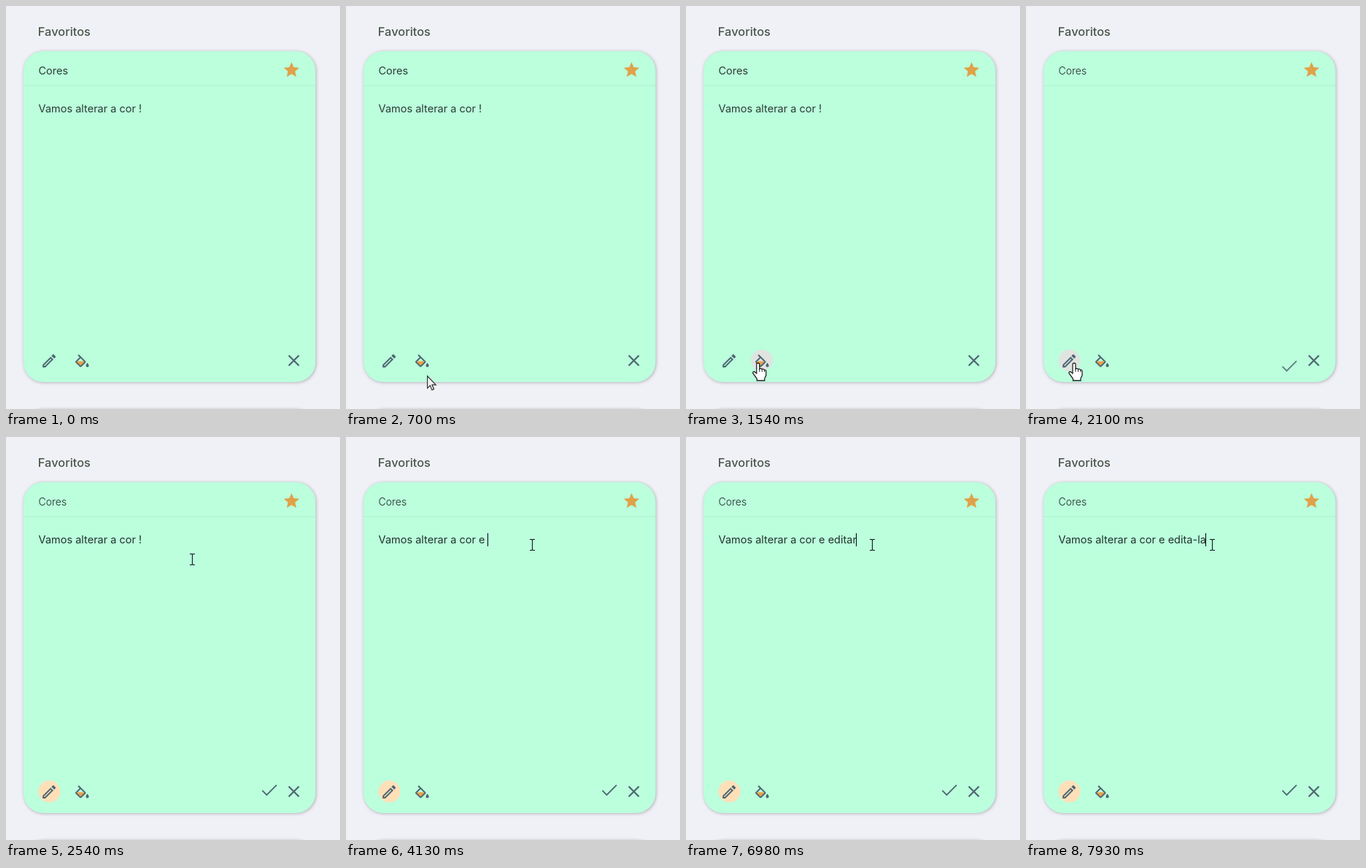
Animation, 458 px wide and 553 px high, one loop 8 s. Source, as an HTML page with a canvas:

```html
<!DOCTYPE html>
<html lang="pt">
<head>
<meta charset="utf-8">
<title>Favoritos</title>
<style>
  html, body { margin: 0; width: 100%; height: 100%; overflow: hidden; background: #f0f1f6; }
  canvas { display: block; width: 458px; height: 553px; }
</style>
</head>
<body>
<canvas id="stage" width="458" height="553"></canvas>
<script>
const ctx = document.getElementById('stage').getContext('2d');
const LOOP = 8000;
const OPEN = 2060;
const SLATE = '#4d6671';
const BODY = '400 14.52px';

const icons = {
  star: new Path2D('M12 17.27 18.18 21l-1.64-7.03L22 9.24l-7.19-.61L12 2 9.19 8.63 2 9.24l5.46 4.73L5.82 21z'),
  pencil: new Path2D('M14.06 9.02l.92.92L5.92 19H5v-.92l9.06-9.06M17.66 3c-.25 0-.51.1-.7.29l-1.83 1.83 3.75 3.75 1.83-1.83c.39-.39.39-1.02 0-1.41l-2.34-2.34c-.2-.2-.45-.29-.71-.29zm-3.6 3.19L3 17.25V21h3.75L17.81 9.94z'),
  bucket: new Path2D('M16.56 8.94 7.62 0 6.21 1.41l2.38 2.38-5.15 5.15c-.59.59-.59 1.54 0 2.12l5.5 5.5c.59.59 1.53.59 2.12 0l5.5-5.5c.59-.58.59-1.53 0-2.12zM5.21 10 10 5.21 14.79 10zM19 11.5s-2 2.17-2 3.5a2 2 0 0 0 4 0c0-1.33-2-3.5-2-3.5z'),
  paint: new Path2D('M5.2 9.3h9.6l.4.7-5.2 5-5.2-5z'),
  close: new Path2D('M-7-7 7 7M7-7-7 7'),
  check: new Path2D('M0 8 6 14 19.5 .5'),
  arrow: new Path2D('M0 0V16.5L3.8 13 6.3 19 9 17.8 6.4 12H11.6z'),
  hand: new Path2D('M-2 2Q-2 0 0 0T2 2V8Q4 6.6 5.5 8.4 7.5 7.4 8.7 9.4 11 9 11 11.5V17L9 21V24H-1.5V21.5L-7 14Q-7.5 11.5-5 11.7L-2 14.2z'),
  knuckles: new Path2D('M2 8V12M5.5 8.6V12M8.7 9.6V12'),
  beam: new Path2D('M-3.5-7.5H-1L0-6.5 1-7.5H3.5M0-6.5V6.5M-3.5 7.5H-1L0 6.5 1 7.5H3.5')
};

// Pointer path: time, x, y
const track = [
  [420, 205, 556], [560, 181, 529], [700, 112, 508], [820, 64, 491], [900, 68, 491],
  [1020, 88, 491], [1260, 103, 490], [1500, 103, 490], [1860, 66, 490], [2140, 66, 490],
  [2400, 245, 218], [2500, 255, 176], [2540, 255, 168], [2640, 255, 158], [2940, 255, 148]
];

// Typing: time, text after "Vamos alterar a cor ", caret shown
const typing = [
  [0, '!', 0], [2900, '!', 1], [3440, '!', 0], [3710, '', 0], [3900, 'e', 1], [4130, 'e ', 1],
  [4630, 'e ', 0], [4750, 'e e', 1], [4980, 'e ed', 1], [5180, 'e edi', 1], [5290, 'e edit', 1],
  [5670, 'e edita', 1], [6210, 'e edita', 0], [6710, 'e edita', 1], [6980, 'e editar', 1],
  [7410, 'e edita', 1], [7610, 'e edita-', 1], [7850, 'e edita-l', 1], [7930, 'e edita-la', 1]
];

const ramp = (t, a, b) => Math.min(1, Math.max(0, (t - a) / (b - a)));
const pulse = (t, a, b) => Math.min(ramp(t, a, a + 120), 1 - ramp(t, b, b + 240));

function draw(path, x, y, { fill, stroke, width = 1, scale = 1 }) {
  ctx.save();
  ctx.translate(x, y);
  ctx.scale(scale, scale);
  if (fill) { ctx.fillStyle = fill; ctx.fill(path); }
  if (stroke) { ctx.strokeStyle = stroke; ctx.lineWidth = width; ctx.stroke(path); }
  ctx.restore();
}

function text(str, x, y, font, color) {
  ctx.font = font + ' Inter, sans-serif';
  ctx.fillStyle = color;
  ctx.fillText(str, x, y);
}

function disc(x, color, alpha) {
  ctx.globalAlpha = alpha;
  ctx.fillStyle = color;
  ctx.beginPath();
  ctx.arc(x, 486.5, 15, 0, Math.PI * 2);
  ctx.fill();
  ctx.globalAlpha = 1;
}

function card(y) {
  ctx.save();
  ctx.shadowColor = 'rgba(50, 40, 60, .34)';
  ctx.shadowBlur = 4;
  ctx.shadowOffsetX = .8;
  ctx.shadowOffsetY = .8;
  ctx.fillStyle = '#bbffdd';
  ctx.beginPath();
  ctx.roundRect(24, y, 400.5, 454, 27);
  ctx.fill();
  ctx.restore();
}

function note(t) {
  const editing = t >= OPEN;
  text('Cores', 44.5, 94, editing ? '300 14px' : BODY, editing ? '#1d2b24' : '#2c3b33');

  const [, tail, caret] = typing.findLast(step => t >= step[0]);
  const line = 'Vamos alterar a cor ' + tail;
  ctx.globalAlpha = editing ? ramp(t, 2140, 2300) : 1;
  text(line, 44.6, 146, BODY, editing ? '#22322a' : '#2c3b33');
  ctx.globalAlpha = 1;
  if (caret) {
    ctx.fillStyle = '#000';
    ctx.fillRect(Math.floor(44.6 + ctx.measureText(line).width), 132, 1, 18);
  }
}

function toolbar(t) {
  disc(59.5, '#dfe4e1', Math.max(pulse(t, 780, 940), ramp(t, 1760, 1880)));
  disc(59.5, '#fee0b8', ramp(t, 2140, 2340));
  disc(104, '#dfe4e1', pulse(t, 1060, 1660));
  draw(icons.pencil, 47.2, 475, { fill: SLATE });
  draw(icons.bucket, 92, 478, { fill: SLATE, scale: 1.03 });
  draw(icons.paint, 92, 478, { fill: '#e6a04a', scale: 1.03 });
  draw(icons.close, 394.7, 486.5, { stroke: SLATE, width: 2.2 });
  if (t >= OPEN) {
    const rise = ramp(t, OPEN, 2300);
    ctx.globalAlpha = .8 + .2 * rise;
    draw(icons.check, 351.5, 477.2 + 11.5 * (1 - rise), { stroke: SLATE, width: 1.8 });
    ctx.globalAlpha = 1;
  }
}

function pointer(t) {
  if (t < track[0][0]) return;
  const i = track.findLastIndex(p => t >= p[0]);
  const a = track[i], b = track[i + 1] || a;
  const k = a === b ? 0 : ramp(t, a[0], b[0]);
  const x = a[1] + (b[1] - a[1]) * k, y = a[2] + (b[2] - a[2]) * k;
  const over = cx => Math.hypot(x - cx, y - 486.5) < 15;
  if (t > 2140 && y < 460) {
    draw(icons.beam, Math.floor(x) + .5, Math.round(y), { stroke: '#101c16', width: 1.1 });
  } else if (over(59.5) || over(104)) {
    draw(icons.hand, x, y, { fill: '#fff', stroke: '#222', width: 1.3 });
    draw(icons.knuckles, x, y, { stroke: '#222' });
  } else {
    draw(icons.arrow, x, y, { fill: '#f2f2f2', stroke: '#333', width: 1.2 });
  }
}

function render(t) {
  ctx.fillStyle = '#f0f1f6';
  ctx.fillRect(0, 0, 458, 553);
  text('Favoritos', 43.8, 41, '500 16.4px', '#4a574c');
  card(62);
  card(553);
  ctx.fillStyle = '#b0edd0';
  ctx.fillRect(24, 108.6, 400, 1);
  draw(icons.star, 378.7, 74.8, { fill: '#e0a148', scale: 1.07 });
  note(t);
  toolbar(t);
  pointer(t);
}

const start = performance.now();
function tick() {
  render((performance.now() - start) % LOOP);
  requestAnimationFrame(tick);
}
tick();
</script>
</body>
</html>
```
